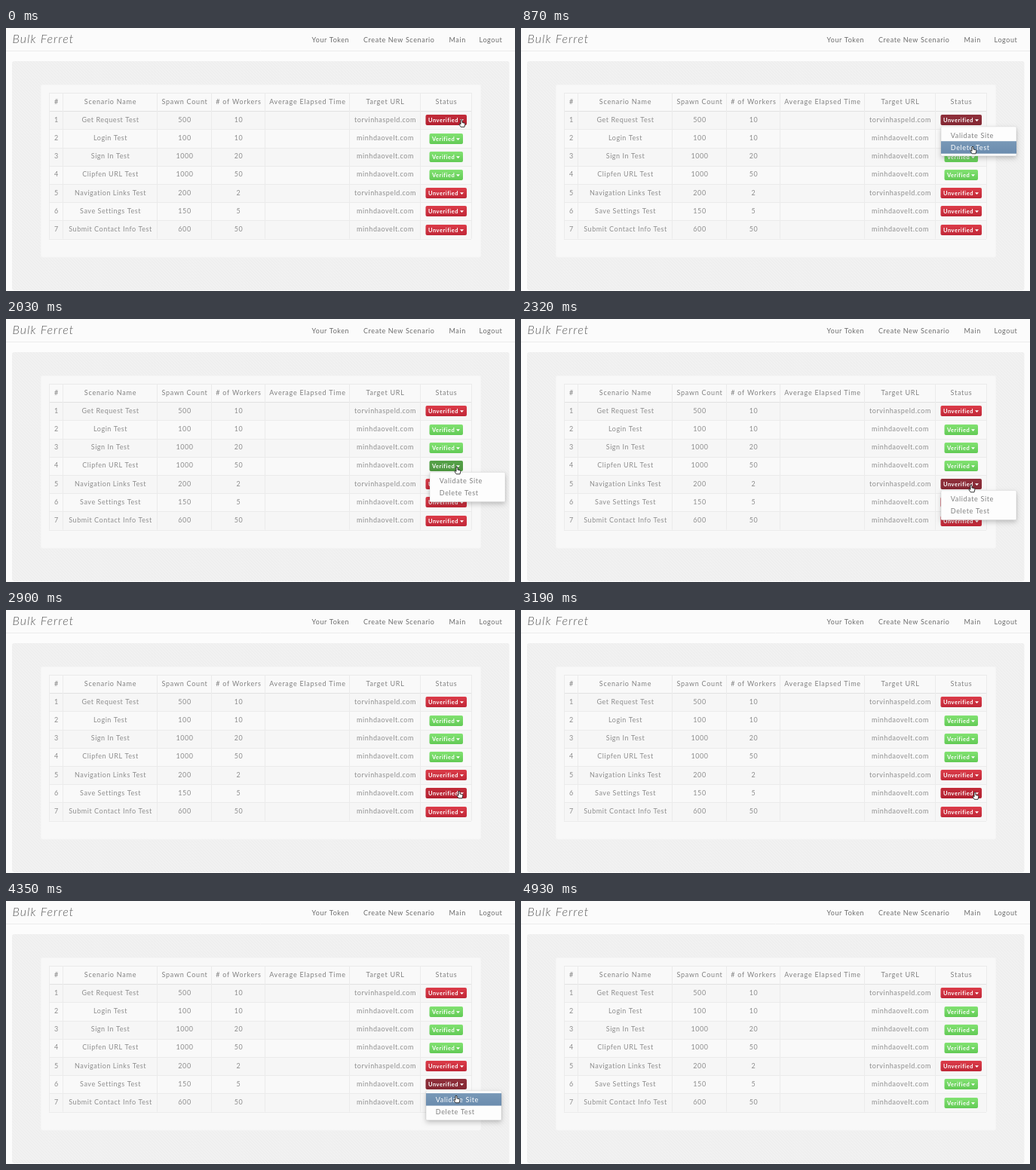
Animation of 675x349 px, one loop 5220 ms. Source, as an HTML page with a canvas:

```html
<!DOCTYPE html>
<html lang="en">
<head>
<meta charset="utf-8">
<title>Bulk Ferret</title>
<style>
html, body { margin: 0; width: 100%; height: 100%; overflow: hidden; background: #fcfcfc; }
canvas { display: block; width: 675px; height: 349px; }
</style>
</head>
<body>
<canvas id="stage" width="675" height="349"></canvas>
<script>
const ctx = document.getElementById('stage').getContext('2d');
const STEP = 290, LOOP = 5220;
const COLS = [57, 75, 200, 272, 343, 455, 549, 617];
const TOP = 86, ROW = 24.2;
const HEAD = ['#', 'Scenario Name', 'Spawn Count', '# of Workers', 'Average Elapsed Time', 'Target URL', 'Status'];
const SITE_A = 'torvinhaspeld.com', SITE_B = 'minhdaovelt.com';
const ROWS = [
  ['Get Request Test', 500, 10, SITE_A],
  ['Login Test', 100, 10, SITE_B],
  ['Sign In Test', 1000, 20, SITE_B],
  ['Clipfen URL Test', 1000, 50, SITE_B],
  ['Navigation Links Test', 200, 2, SITE_A],
  ['Save Settings Test', 150, 5, SITE_B],
  ['Submit Contact Info Test', 600, 50, SITE_B]
];
const ITEMS = ['Validate Site', 'Delete Test'];
const RED = { normal: ['#dc3c49', '#c02737'], hover: ['#c22c3a', '#b32030'], active: ['#8f303b', '#842733'] };
const GREEN = { normal: ['#82e272', '#62ca55'], hover: ['#70cd60', '#58b14b'], active: ['#55a148', '#4d9640'] };

// Each step: pointer position, hovered row, open menu, highlighted item.
const STEPS = [
  { at: [604, 121.5], hover: 1 },
  { at: [604, 121.5], hover: 1 },
  { at: [603, 121], hover: 1 },
  { at: [599, 157], open: 1, item: 1 },
  { at: [598.5, 147], hover: 2 },
  { at: [598.5, 146.5], hover: 2 },
  { at: [598.5, 146.5], open: 2 },
  { at: [598, 196], open: 4 },
  { at: [597, 220], open: 5 },
  { at: [598, 219], open: 5 },
  { at: [601, 240], hover: 6 },
  { at: [602, 241.5], hover: 6 },
  { at: [600, 258], open: 6, item: 0 },
  { at: [590.5, 260], arrow: true },
  { at: [597, 282], open: 7, item: 0 },
  { at: [597, 258], open: 6, item: 0 },
  {},
  {}
];

function isVerified(row, step) {
  return (row >= 2 && row <= 4) || (row === 7 && step >= 15) || (row === 6 && step >= 16);
}

function text(str, x, y, color, { size = 9, space = 0.55, style = '', align = 'left' } = {}) {
  ctx.font = `${style} ${size}px Lato, sans-serif`;
  ctx.letterSpacing = space + 'px';
  ctx.textAlign = align;
  ctx.fillStyle = color;
  ctx.fillText(str, x, y);
}

function box(x, y, w, h, r, fill, stroke) {
  ctx.beginPath();
  ctx.roundRect(x, y, w, h, r);
  ctx.fillStyle = fill;
  ctx.fill();
  if (stroke) {
    ctx.strokeStyle = stroke;
    ctx.lineWidth = 1;
    ctx.stroke();
  }
}

function line(x1, y1, x2, y2, color) {
  ctx.strokeStyle = color;
  ctx.lineWidth = 1;
  ctx.beginPath();
  ctx.moveTo(x1, y1);
  ctx.lineTo(x2, y2);
  ctx.stroke();
}

function fade(y, h, [light, dark]) {
  const fill = ctx.createLinearGradient(0, y, 0, y + h);
  fill.addColorStop(0, light);
  fill.addColorStop(1, dark);
  return fill;
}

function weave() {
  const tile = document.createElement('canvas');
  tile.width = tile.height = 4;
  const g = tile.getContext('2d');
  g.fillStyle = 'rgba(0,0,0,.016)';
  for (let i = 0; i < 4; i++) g.fillRect(i, i, 1, 1);
  return ctx.createPattern(tile, 'repeat');
}
const hatch = weave();

function page() {
  ctx.fillStyle = '#fcfcfc';
  ctx.fillRect(0, 0, 675, 349);
  ctx.fillStyle = '#fbfbfb';
  ctx.fillRect(0, 0, 675, 30);
  line(0, 30.5, 675, 30.5, '#ececec');
  text('Bulk Ferret', 8.5, 20.3, '#5c5c5c', { size: 16, space: 1.05, style: 'italic 300' });
  [['Your Token', 405.5], ['Create New Scenario', 474], ['Main', 587.5], ['Logout', 627.5]]
    .forEach(([label, x]) => text(label, x, 18.8, '#6c6c6c', { space: 0.6 }));

  box(8, 44, 659.5, 304, 3, '#f1f1f1');
  box(8, 44, 659.5, 304, 3, hatch);
  box(46.5, 75.5, 583, 228.5, 2, '#f8f8f8', '#f5f5f5');
}

function table() {
  const right = COLS[7], bottom = TOP + 8 * ROW;
  const rowTop = i => Math.round(TOP + i * ROW);
  for (let i = 0; i < 8; i++) {
    ctx.fillStyle = i % 2 ? '#f6f6f6' : '#f9f9f9';
    ctx.fillRect(COLS[0], rowTop(i), right - COLS[0], ROW);
  }
  for (let i = 0; i <= 8; i++) {
    const y = rowTop(i) + 0.5;
    line(COLS[0], y, right, y, i === 1 ? '#e2e2e2' : '#ebebeb');
  }
  COLS.forEach(x => line(x + 0.5, TOP, x + 0.5, bottom, '#ebebeb'));

  const cell = (str, col, y, color, space) =>
    text(str, (COLS[col] + COLS[col + 1]) / 2 + 1, y, color, { align: 'center', space });
  HEAD.forEach((label, i) => cell(label, i, 101, '#828282', 0.75));
  ROWS.forEach(([name, count, workers, site], i) => {
    const y = 124.8 + i * ROW;
    [i + 1, name, count, workers, '', site].forEach((v, col) => cell(String(v), col, y, '#8e8e8e'));
  });
}

function button(row, verified, state) {
  const x = verified ? 561.5 : 556.5;
  const w = verified ? 44.5 : 54.5;
  const y = Math.round(115.3 + (row - 1) * ROW);
  box(x, y, w, 14, 2, fade(y, 14, (verified ? GREEN : RED)[state]));
  text(verified ? 'Verified' : 'Unverified', x + 3.5, y + 10, '#fff', { size: 7.5, space: 0.5, style: 'bold' });
  const cx = x + w - 6.5;
  ctx.beginPath();
  ctx.moveTo(cx - 2.5, y + 6.2);
  ctx.lineTo(cx + 2.5, y + 6.2);
  ctx.lineTo(cx, y + 8.9);
  ctx.fill();
}

function menu(row, verified, picked) {
  const x = verified ? 562 : 557;
  const y = 130.8 + (row - 1) * ROW;
  ctx.save();
  ctx.shadowColor = 'rgba(0,0,0,.22)';
  ctx.shadowBlur = 6;
  ctx.shadowOffsetY = 3;
  box(x, y, 100, 39, 1.5, '#fdfdfd');
  ctx.restore();
  box(x, y, 100, 39, 1.5, '#fdfdfd', 'rgba(0,0,0,.08)');
  ITEMS.forEach((label, i) => {
    const top = y + 3.3 + i * 16.1;
    if (i === picked) {
      ctx.fillStyle = fade(top, 16.5, ['#7898b7', '#6b8cae']);
      ctx.fillRect(x, top, 100, 16.5);
    }
    text(label, x + 12.7, top + 11.4, i === picked ? '#fff' : '#808080', { space: 0.65 });
  });
}

const ARROW = new Path2D('M0 0V9L2 7.2L3.5 10.5L5 9.8L3.6 6.6H6.3Z');
const HAND = new Path2D('M-1 .8Q0-.4 1 .8V4L4 4.7Q5 5 4.8 6.3L4 9.8H-.8L-3 6.5Q-3.2 5.2-2 5.5L-1 6.4Z');

function pointer([x, y], arrow) {
  ctx.save();
  ctx.translate(x, y);
  ctx.lineWidth = 0.9;
  ctx.lineJoin = 'round';
  ctx.fillStyle = arrow ? '#151515' : '#fff';
  ctx.strokeStyle = arrow ? '#eee' : '#222';
  const shape = arrow ? ARROW : HAND;
  ctx.fill(shape);
  ctx.stroke(shape);
  ctx.restore();
}

function draw(now) {
  const step = Math.floor((now % LOOP) / STEP);
  const { at, hover, open, item, arrow } = STEPS[step];
  page();
  table();
  for (let row = 1; row <= 7; row++) {
    const state = row === open ? 'active' : row === hover ? 'hover' : 'normal';
    button(row, isVerified(row, step), state);
  }
  if (open) menu(open, isVerified(open, step), item);
  if (at) pointer(at, arrow);
}

const start = performance.now();
function tick() {
  draw(performance.now() - start);
  requestAnimationFrame(tick);
}
tick();
</script>
</body>
</html>
```
